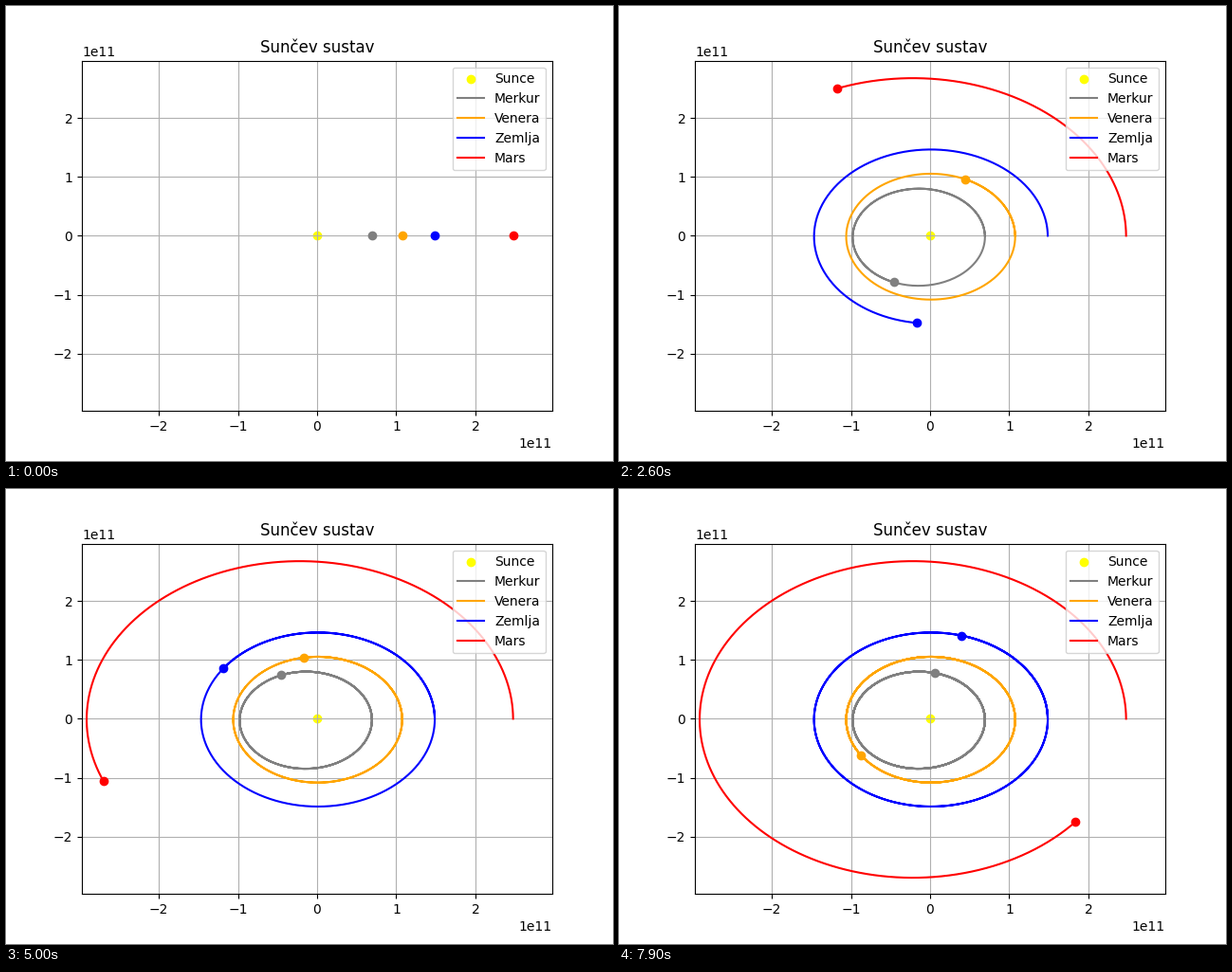
A matplotlib script for the animation above (8000 ms loop, 640 px wide and 480 px high).

```python
import numpy as np
import matplotlib.pyplot as plt
from matplotlib.animation import FuncAnimation

GM = 6.674e-11 * 1.989e30
AU = 1.4863e11
DAY = 86400
FRAMES = 80
DAYS_PER_FRAME = 10

# name, colour, starting distance (AU), starting speed (m/s)
PLANETS = [
    ("Merkur", "gray", 0.466, 47360),
    ("Venera", "orange", 0.723, 35020),
    ("Zemlja", "blue", 1.0, 29780),
    ("Mars", "red", 1.666, 24070),
]


def orbit(distance, speed, steps):
    """Daily positions, integrated with the semi-implicit Euler method."""
    pos = np.array([distance, 0.0])
    vel = np.array([0.0, speed])
    path = [pos]
    for _ in range(steps):
        vel = vel - GM * pos / np.hypot(*pos) ** 3 * DAY
        pos = pos + vel * DAY
        path.append(pos)
    return np.array(path)


fig, ax = plt.subplots(figsize=(6.4, 4.8), dpi=100)
ax.scatter(0, 0, color="yellow", label="Sunce")

bodies = []
for name, color, distance, speed in PLANETS:
    path = orbit(distance * AU, speed, FRAMES * DAYS_PER_FRAME)
    trail, = ax.plot([], [], color=color, lw=1.5, label=name)
    dot, = ax.plot([], [], "o", color=color)
    bodies.append((path, trail, dot))

limit = 1.2 * PLANETS[-1][2] * AU
ax.set_xlim(-limit, limit)
ax.set_ylim(-limit, limit)
ax.set_title("Sunčev sustav")
ax.grid(True)
ax.legend(loc="upper right")


def update(frame):
    day = frame * DAYS_PER_FRAME
    artists = []
    for path, trail, dot in bodies:
        trail.set_data(*path[:day + 1].T)
        dot.set_data(*path[day:day + 1].T)
        artists += [trail, dot]
    return artists


anim = FuncAnimation(fig, update, frames=FRAMES, interval=100,
                     repeat=True, repeat_delay=0, blit=False)
plt.show()
```
